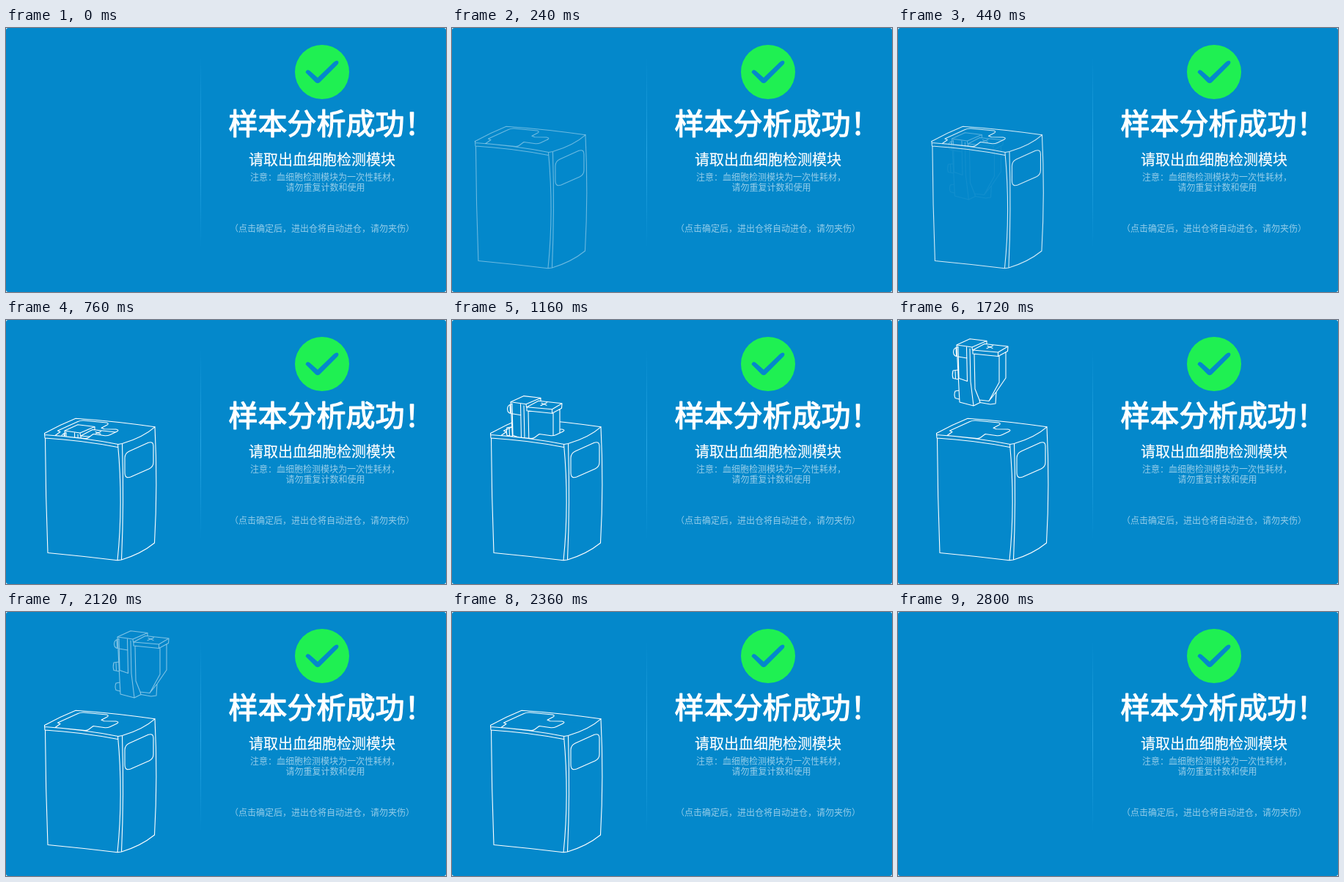
Animation of 600x360 px, one loop 3 s. Source, as an HTML page with a canvas:

```html
<!DOCTYPE html>
<html lang="zh-CN">
<head>
<meta charset="utf-8">
<style>
html, body { margin: 0; width: 100%; height: 100%; overflow: hidden; background: #fff; }
canvas { display: block; }
</style>
</head>
<body>
<canvas id="stage" width="600" height="360"></canvas>
<script>
const ctx = document.getElementById('stage').getContext('2d');
const BLUE = '#0488cb';
const FONT = '"Noto Sans CJK SC", "Noto Sans CJK", sans-serif';
const LOOP = 3000, STEP = 40;

const slotFront = 'L67 157.5 L108 161.5 Q111 161.5 113 160 L119 155.5 L135 157.8 Q139 158 142 156.5 L151.5 152';

const box = {
  back: new Path2D(`
    M52.5 154.5 Q73 143 95 134.2 Q150 138 203 145.8
    M67 157.5 L74 152.5 L70.5 151 L98 138.5 Q102 136.7 106 137
    L137 140 Q141 141 138 143 L130 147.3 L134 148.8 L150 149 Q155 150 151.5 152`),
  mask: new Path2D(`M52 156 ${slotFront} L203 146 Q207 225 202.5 304 L158 327 L152 328 L57 317.5 Z`),
  front: new Path2D(`
    M67 157.5 ${slotFront}
    M52.5 154.5 L53 161 Q103 164 152.5 173.5
    M52.5 156.5 Q104 160 153 169.5 L158.5 168.5 Q187 160 203 145.8
    M53.5 161 Q54 240 57 317.5 Q105 322 152 327.8 L157.5 327 Q184 319 202.5 304 Q207 225 203 145.8
    M152.5 169.5 Q160 250 152 327.8 M158.5 168.5 Q161 250 157.5 327
    M162 188 Q162 182 168 179 L194 167.3 Q201 165 201 172 L201 194 Q201 200 195 203
    L170 214 Q162 217 162 208 Z`)
};

const unit = {
  body: new Path2D(`M80 34 L98 25.8 L121 28.5 L121 32.5 L150 36 L149.5 42.5 L147 44 L147 79
    L134 98 L133 114 L126 115 L112 112.5 L103 117 L84 112 Z`),
  lines: new Path2D(`
    M80 34 L98 25.8 L121 28.5 L121 32.5 M80 34 L84 112 L103 117 L112 112.5
    M80 34 L101 37 L121 28.5 M82 36 L83 79.5 L94.5 83.5 L93.5 37 M82 50 L94 52
    M101 37 L101.5 41 M99 84 L103 117 M98 39 L99 84
    M102 41 L118 32.5 L150 36 L136.5 44 Z
    M102 41 L102 46 L136.5 49.5 L149.5 42.5 L150 36 M136.5 44 L136.5 49.5
    M122 35.5 L129 38.5 M129.5 35 L121 38.8
    M104 46.5 L105 94 L111 109 L124 110.5 L138 85 L138 49
    M147 44 L147 79 L134 98 L124 110.5 M134 98 L133 114 L126 115 L112 112.5 L111 109
    M81 37 Q75.5 38 75.5 44 Q76 50 82 50 M79 38 L79.5 49
    M82 68 L75 69 Q73.5 75 75 79.5 L82.5 81 M78 69 L78.5 80
    M83 96 L78 97 Q76 102 78 106.5 L83.5 108`)
};

const tick = new Path2D('M408.5 60.5 Q410 55 414.5 58.5 L425 67.8 L447 46.5 Q452 42.5 453.5 46.5 Q453.5 49 451 51 L428 74 Q425 76.5 422 74 Z');

const clamp = v => Math.min(1, Math.max(0, v));
const span = (t, a, b) => clamp((t - a) / (b - a));
const easeOut = (p, n) => 1 - Math.pow(1 - p, n);

// The outline gives a weight between regular and bold.
function label(str, x, y, size, color, outline = 0) {
  ctx.font = `${size}px ${FONT}`;
  ctx.fillStyle = ctx.strokeStyle = color;
  ctx.fillText(str, x, y);
  if (!outline) return;
  ctx.lineWidth = outline;
  ctx.lineJoin = 'round';
  ctx.strokeText(str, x, y);
}

function drawPanel() {
  ctx.fillStyle = BLUE;
  ctx.beginPath();
  ctx.roundRect(0, 0, 600, 360, 3);
  ctx.fill();

  const g = ctx.createLinearGradient(0, 40, 0, 300);
  g.addColorStop(0, 'rgba(50,175,235,0)');
  g.addColorStop(0.5, 'rgba(50,175,235,.75)');
  g.addColorStop(1, 'rgba(50,175,235,0)');
  ctx.fillStyle = g;
  ctx.fillRect(265, 40, 1, 260);

  ctx.fillStyle = '#1ff052';
  ctx.beginPath();
  ctx.arc(431, 60, 37, 0, Math.PI * 2);
  ctx.fill();
  ctx.fillStyle = BLUE;
  ctx.fill(tick);

  const soft = 'rgba(255,255,255,.58)';
  label('样本分析成功！', 303.5, 145, 40, '#fff', 1.3);
  label('请取出血细胞检测模块', 331, 187, 20, '#fff', 0.2);
  label('注意：血细胞检测模块为一次性耗材，', 333, 208, 12, soft);
  label('请勿重复计数和使用', 381.5, 222, 12, soft);
  label('（点击确定后，进出仓将自动进仓，请勿夹伤）', 305, 278, 12, soft);
}

function drawUnit(dx, dy, alpha) {
  ctx.save();
  ctx.translate(dx, dy);
  ctx.globalAlpha = alpha;
  ctx.fill(unit.body);
  ctx.stroke(unit.lines);
  ctx.restore();
}

function draw(t) {
  ctx.clearRect(0, 0, 600, 360);
  drawPanel();

  const slide = -46 * (1 - easeOut(span(t, 40, 760), 2.4));
  const fade = 1 - span(t, 2640, 2800);
  const boxAlpha = span(t, 40, 520) * fade;
  const lift = 117 * (1 - easeOut(span(t, 1040, 1720), 2.1));
  const leave = span(t, 1880, 2360);
  const unitAlpha = span(t, 280, 760) * (1 - leave);
  if (!boxAlpha) return;

  ctx.save();
  ctx.translate(slide, 0);
  ctx.strokeStyle = '#fff';
  ctx.fillStyle = BLUE;
  ctx.lineWidth = 1.1;
  ctx.lineJoin = ctx.lineCap = 'round';
  ctx.globalAlpha = boxAlpha;
  ctx.stroke(box.back);
  if (unitAlpha) drawUnit(96 * easeOut(leave, 2), lift, unitAlpha);
  ctx.fill(box.mask);
  ctx.stroke(box.front);
  ctx.restore();
}

function tickFrame() {
  const t = performance.now() % LOOP;
  draw(Math.floor(t / STEP) * STEP);
  requestAnimationFrame(tickFrame);
}
tickFrame();
</script>
</body>
</html>
```
